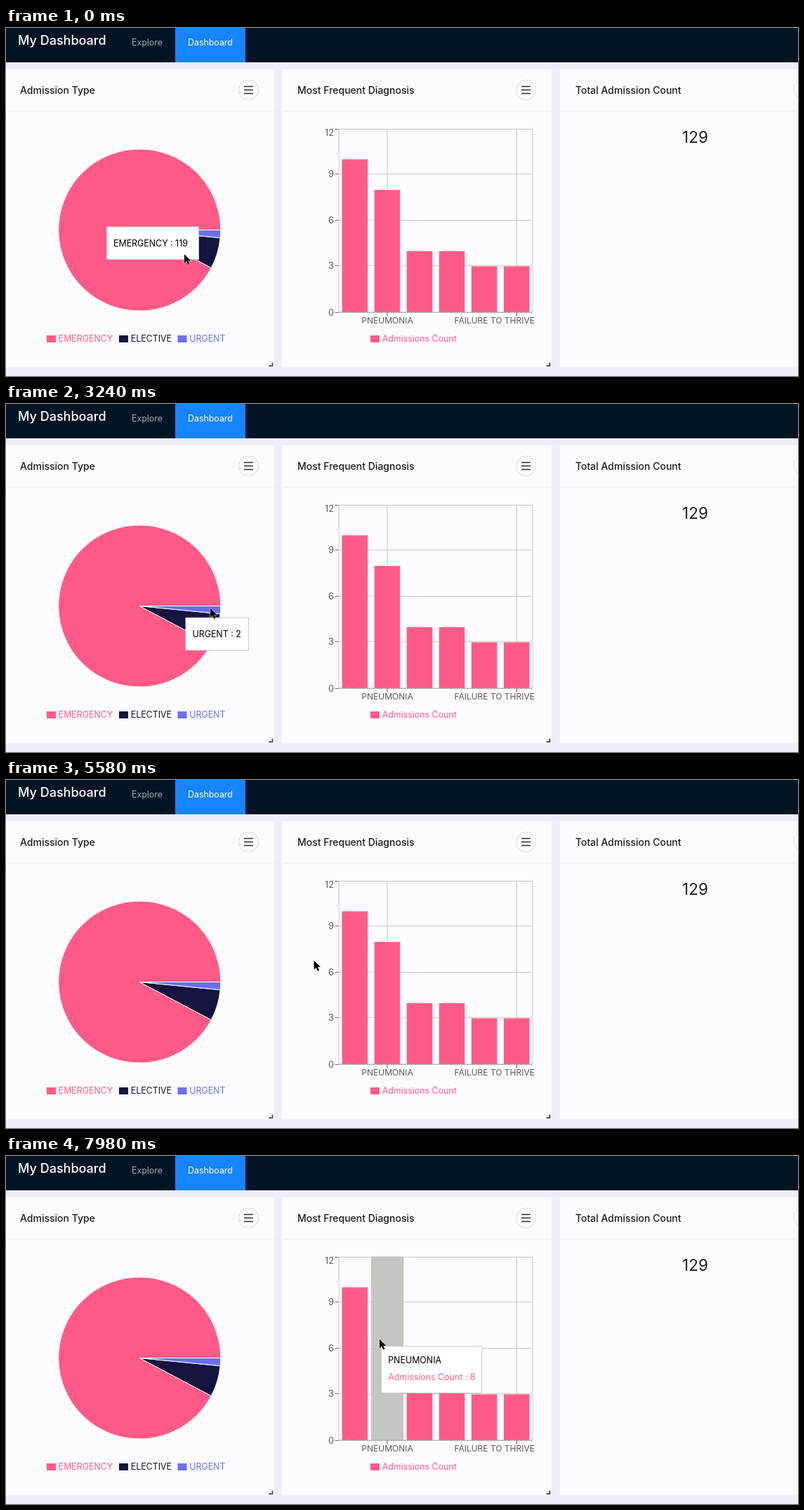
An HTML page for the animation above (8000 ms loop, 1128 px wide and 497 px high).

```html
<!DOCTYPE html>
<html lang="en">
<head>
<meta charset="utf-8">
<title>My Dashboard</title>
<style>
  html, body { margin: 0; width: 100%; height: 100%; overflow: hidden; background: #eeeef9; }
  svg { display: block; font: 12.4px Inter, Roboto, sans-serif; }
  .head { font-size: 14px; font-weight: 500; fill: #1c1c1f; }
  .axis { font-size: 12px; fill: #58585a; }
  .line { fill: none; stroke: #cbc9c3; }
</style>
</head>
<body>
<svg id="stage" width="1128" height="497" viewBox="0 0 1128 497"></svg>
<script>
const PINK = '#ff5a87', NAVY = '#14143f', VIOLET = '#6c6cff', LOOP = 8000;
const stage = document.getElementById('stage');

function add(parent, tag, attrs, text) {
  const el = document.createElementNS('http://www.w3.org/2000/svg', tag);
  for (const k in attrs) el.setAttribute(k, attrs[k]);
  if (text !== undefined) el.textContent = text;
  return parent.appendChild(el);
}
const rect = (x, y, width, height, fill) => add(stage, 'rect', { x, y, width, height, fill });
const path = (d, attrs) => add(stage, 'path', { d, ...attrs });
const label = (x, y, text, attrs) => add(stage, 'text', { x, y, ...attrs }, text);

// Navigation bar
rect(0, 0, 1128, 49, '#001424');
rect(241, 0, 100, 49, '#1685ff');
label(17, 24.3, 'My Dashboard', { fill: '#fff', 'font-size': 18, 'font-weight': 500 });
label(179, 24.5, 'Explore', { fill: '#a3a9b0' });
label(259, 24.5, 'Dashboard', { fill: '#fff' });

// Cards
function card(x, width, titleX, title, menuX) {
  rect(x, 59, width, 426, '#fcfcfe');
  rect(x, 118, width, 1, '#ececf0');
  label(titleX, 93.7, title, { class: 'head' });
  add(stage, 'circle', { cx: menuX, cy: 88.5, r: 14, fill: '#fff', stroke: '#d5d5d9' });
  path(`M${menuX - 6.5} 83.5h13m-13 5h13m-13 5h13`, { stroke: '#2a2a2c', 'stroke-width': 1.3 });
  const right = x + width;
  path(`M${right - 2.5} 478v4.5h-5`, { fill: 'none', stroke: '#4c4c50', 'stroke-width': 1.8 });
}
card(0, 382, 20, 'Admission Type', 345.5);
card(393, 384, 415, 'Most Frequent Diagnosis', 740.5);
card(789, 384, 811, 'Total Admission Count', 1136);
label(981.5, 164, '129', { 'text-anchor': 'middle', 'font-size': 22.5, fill: '#1c1c1f' });

// Pie, running counterclockwise from three o'clock
const pie = { x: 190.2, y: 288.5, r: 115.5 };
const rim = share => {
  const a = -share / 129 * 2 * Math.PI;
  return `${pie.x + pie.r * Math.cos(a)} ${pie.y + pie.r * Math.sin(a)}`;
};
let sum = 0;
for (const [count, fill] of [[119, PINK], [8, NAVY], [2, VIOLET]]) {
  const from = rim(sum), to = rim(sum += count);
  path(`M${pie.x} ${pie.y}L${from}A${pie.r} ${pie.r} 0 ${+(count > 64)} 0 ${to}Z`, { fill, stroke: '#fff' });
}

function legend(x, text, fill) {
  rect(x, 439, 13, 10, fill);
  label(x + 16.7, 448, text, { fill });
}
legend(58, 'EMERGENCY', PINK);
legend(161, 'ELECTIVE', NAVY);
legend(244.5, 'URGENT', VIOLET);
legend(519, 'Admissions Count', PINK);

// Bar chart
const left = 474, base = 406, band = 46.08, unit = 21.85;
for (let v = 0; v <= 12; v += 3) {
  const y = Math.round(base - v * unit) - 0.5 + (v === 0 || v === 12);
  path(`M${left} ${y}H750`, { class: 'line' });
  path(`M468.5 ${y}h5`, { stroke: '#666' });
  label(467, v === 12 ? 154 : y + 4.5, v, { class: 'axis', 'text-anchor': 'end', style: 'font-size:12.8px' });
}
for (const x of [left, 543, 727.5, 750]) path(`M${x} 143.8V${base}`, { class: 'line' });
[10, 8, 4, 4, 3, 3].forEach((v, i) =>
  rect(left + band * i + 4.6, base - v * unit, 36.5, v * unit, PINK));
const hover = rect(left, 143.5, band, base - 143.5, '#c5c5c1');
path(`M${left} ${base}H750`, { stroke: '#aaa9ad' });
path(`M543 ${base}v5.5M727.5 ${base}v5.5`, { stroke: '#666' });
label(543, 422.4, 'PNEUMONIA', { class: 'axis', 'text-anchor': 'middle' });
label(695.7, 422.4, 'FAILURE TO THRIVE', { class: 'axis', 'text-anchor': 'middle' });

// Tooltip: each entry is the goal reached by easing from the previous one
const tips = [
  { t: -400, x: 143.5, y: 284, w: 131, lines: ['EMERGENCY : 119'] },
  { t: 655, x: 254, y: 314, w: 95.5, lines: ['ELECTIVE : 8'] },
  { t: 3090, x: 257, y: 300.5, w: 89.5, lines: ['URGENT : 2'] },
  { t: 3500, x: 552, y: 243, w: 0, lines: [] },
  { t: 5940, x: 507, y: 273, w: 150.5, band: 0, lines: ['SEPSIS', 'Admissions Count : 10'] },
  { t: 7840, x: 552.5, y: 271, w: 143, band: 1, lines: ['PNEUMONIA', 'Admissions Count : 8'] }
];
const tooltip = add(stage, 'g', {});
const box = add(tooltip, 'rect', { fill: '#fff', stroke: '#ccc' });
const rows = ['#000', PINK].map((fill, i) => add(tooltip, 'text', { x: 9.5, y: 27.8 + 23.8 * i, fill }));

// Pointer
const arrow = path('M0 0V13L3 10.3 5.2 15.2 7.6 14.1 5.5 9.4H9.3Z',
  { fill: '#000', stroke: '#fff', 'stroke-width': 1, 'paint-order': 'stroke' });
const route = [
  [0, 254, 323], [300, 257, 324], [820, 272, 318], [960, 273.5, 317], [1560, 274, 302], [2080, 279, 299],
  [2380, 280, 299], [3100, 291, 292], [3260, 291, 291.5], [3940, 345, 272], [4740, 408, 250],
  [5620, 440, 258], [6140, 478, 263], [6560, 492, 262], [7400, 513, 261], [7840, 520, 261], [7980, 532, 261.5], [8000, 532, 261.5]
];

// CSS "ease" curve, solved by bisection
function ease(p) {
  if (p >= 1) return 1;
  const bez = (a, b, s) => 3 * a * s * (1 - s) ** 2 + 3 * b * s * s * (1 - s) + s ** 3;
  let lo = 0, hi = 1;
  for (let i = 0; i < 20; i++) {
    const mid = (lo + hi) / 2;
    if (bez(0.25, 0.25, mid) < p) lo = mid; else hi = mid;
  }
  return bez(0.1, 1, lo);
}
const mix = (a, b, p) => a + (b - a) * p;
const move = (el, x, y) => el.setAttribute('transform', `translate(${x} ${y})`);

function draw() {
  const t = performance.now() % LOOP;

  const n = route.findIndex(k => k[0] > t);
  const [t0, x0, y0] = route[n - 1], [t1, x1, y1] = route[n];
  const p = (t - t0) / (t1 - t0);
  move(arrow, mix(x0, x1, p), mix(y0, y1, p));

  const i = tips.findLastIndex(k => k.t <= t);
  const tip = tips[i], prev = tips[i - 1] || tip;
  const q = ease((t - tip.t) / 400);
  move(tooltip, mix(prev.x, tip.x, q), mix(prev.y, tip.y, q));
  tooltip.style.display = tip.w ? '' : 'none';
  box.setAttribute('width', tip.w);
  box.setAttribute('height', tip.lines.length > 1 ? 66.5 : 46.5);
  rows.forEach((row, r) => row.textContent = tip.lines[r] || '');
  // The two-line version sits higher in its box
  rows[0].setAttribute('y', tip.lines.length > 1 ? 24.3 : 27.8);
  rows[1].setAttribute('y', 48);

  hover.style.display = tip.band === undefined ? 'none' : '';
  hover.setAttribute('x', left + band * (tip.band || 0));
  requestAnimationFrame(draw);
}
draw();
</script>
</body>
</html>
```
